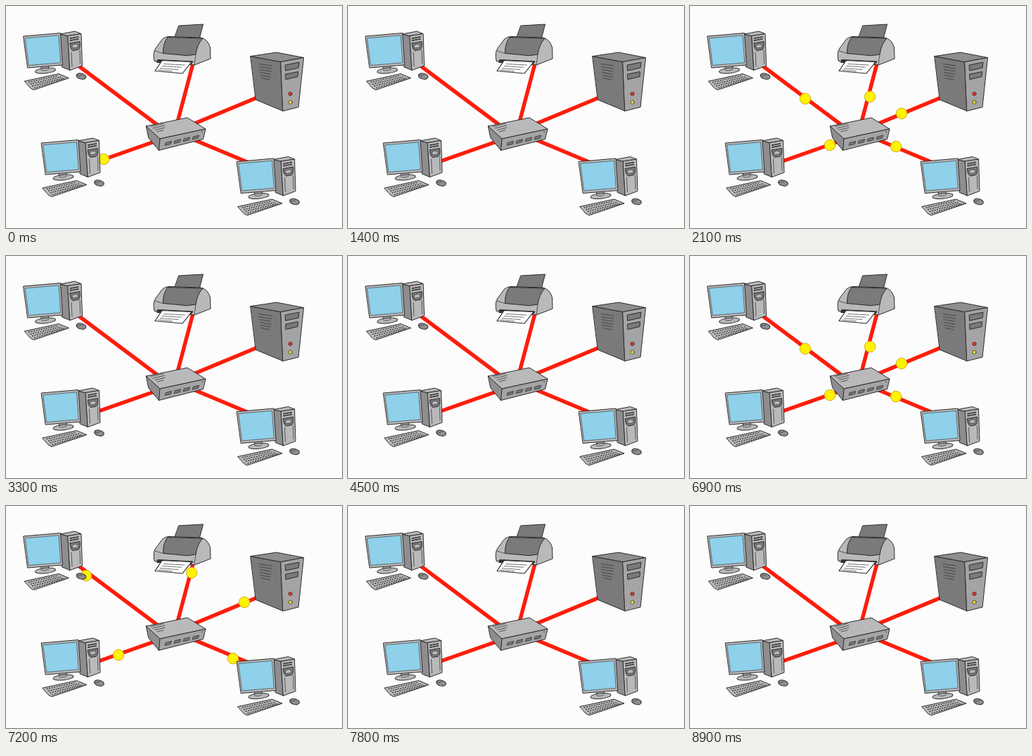
These frames come from a looping animation (478 by 316 pixels, 9 s). An HTML page:

```html
<!DOCTYPE html>
<html lang="en">
<head>
<meta charset="utf-8">
<title>Network hub</title>
<style>
  html, body { margin: 0; width: 100%; height: 100%; overflow: hidden; background: #fdfcfd; }
  svg { display: block; width: 100vw; height: 100vh; }
  .ink { stroke: #2b2b2b; stroke-width: 1; stroke-linejoin: round; stroke-linecap: round; }
  .thin { stroke: #3a3a3a; stroke-width: .8; fill: none; stroke-linecap: round; }
  .light { fill: #b9b9bb; }
  .mid { fill: #a4a4a7; }
  .dim { fill: #8e8d90; }
  .dark { fill: #7b797c; }
  .screen { fill: #8fd0ea; }
  #cables { stroke: #fd1d0b; stroke-width: 5.4; fill: none; }
  #balls circle { fill: #fff204; stroke: #c79d12; stroke-width: .8; }
</style>
</head>
<body>
<svg viewBox="0 0 478 316">
  <defs>
    <g id="computer" class="ink">
      <path class="dim" d="M77 40 88 42.5 91 91.5 80 87Z"/>
      <path class="light" d="M77 40 98 36 107 39.5 88 42.5Z"/>
      <path class="light" d="M88 42.5 107 39.5 108.5 85 91 91.5Z"/>
      <path class="thin" d="M91.5 46 104 43.8M91.5 49 104 46.8" stroke-dasharray="2.6 1.8" style="stroke-width:1.8"/>
      <path class="dark" d="M91 53 105 50.5Q106 60 103 62L95 63.5Q91 61 91 53Z"/>
      <path class="light" d="M94 56Q98 53 102.5 55L102 59 95 60Z" stroke-width=".6"/>
      <path class="thin" d="M93 66 94 86M105 63 105.5 82"/>
      <path class="light" d="M50 85 61 84 60 91 51 92Z"/>
      <ellipse class="light" cx="56" cy="92" rx="14.5" ry="3.8" transform="rotate(-6 56 92)"/>
      <path class="thin" d="M50 91Q55 93.5 61 90"/>
      <path class="light" d="M25 43 77.5 38.5 80.5 84 31 88Z"/>
      <path class="screen" d="M27.5 45.8 75 41.8 77.8 80.8 32.5 84.5Z" stroke-width=".6"/>
      <path class="light" d="M26.5 107 75 96.5 89.5 102.5 39.5 119.5 35 117Z"/>
      <path d="M32 108.5 74.5 99M34.5 111.3 79 100.8M37 114 83 102.4M40 116.8 86 103"
            fill="none" stroke="#444" stroke-width="1.5" stroke-linecap="butt" stroke-dasharray="2.2 1.4"/>
      <ellipse class="dim" cx="107" cy="100" rx="7" ry="4" transform="rotate(14 107 100)"/>
      <path class="thin" d="M101 98.5Q105 101 109 96.8"/>
    </g>
  </defs>

  <g id="cables">
    <path d="M103 85 217 170.5M266 82 244 165M358 130 264 169M344 222.5 264 189M130 221.5 217 191"/>
  </g>
  <g id="balls"></g>

  <g class="ink">
    <path class="light" d="M199.5 171 258 159 284 175 219 189Z"/>
    <path class="mid" d="M219 189 284 175 280.5 189.5 217.5 205.5Z"/>
    <path class="dim" d="M199.5 171 219 189 217.5 205.5 203 188Z"/>
    <path class="thin" d="M206 171.5 224 167.5M209 174 226 170M212 176.5 226 173.2M215 179 224 176.8"/>
    <g id="ports"></g>
    <circle cx="279" cy="179" r="1" fill="#855" stroke="none"/>
  </g>

  <g class="ink">
    <path class="dark" d="M246 28 280.5 26 275 47 240 45Z"/>
    <path class="light" d="M211 78Q208.5 66 213 60L219 52Q223 44 232 43.5L277 45Q287 47 290.5 59L291 75 268 84 262 83Z"/>
    <path class="dark" d="M230 44.5 280 46Q272 54 270 69Q257 72 246 69.5L223.5 67.5Q223 53 230 44.5Z"/>
    <path class="thin" d="M212 64 223.5 67.5M270 69 268 83"/>
    <path d="M216 76.5 266 79 263 83 215 80.5Z" fill="#333"/>
    <path d="M222 77.5 264 79.5 251 96 212 92.5Z" fill="#fff" stroke-width="1.2"/>
    <path d="M225 82.5 254 84M222.5 85.5 250 87.2M219.5 88.6 245 90.5M217 91 237 92.8"
          fill="none" stroke="#555" stroke-width=".9" stroke-dasharray="5 1.2 3 1"/>
  </g>

  <g class="ink">
    <path class="dark" d="M348 71.5 391 79.5 394 149.5 355.5 133.5Z"/>
    <path class="dim" d="M348 71.5 385 66 423.5 73.5 391 79.5Z"/>
    <path class="mid" d="M391 79.5 423.5 73.5 416 144 394 149.5Z"/>
    <path class="dark" d="M397.5 84 417 80 416 88 398 92Z"/>
    <path class="dark" d="M398 97 415.5 93.5 415 100.5 398.3 104.5Z"/>
    <path class="thin" d="M360 82.5 378 85M360.5 86.5 378 89.2M361 90.5 377 93M361.5 94.5 377 97.2M362 98.5 376 101M363 102.5 375 105"/>
    <circle cx="404.5" cy="125" r="2.6" fill="#ed3024" stroke-width=".7"/>
    <circle cx="404.5" cy="137" r="2.6" fill="#e9dc2a" stroke-width=".7"/>
  </g>

  <use href="#computer"/>
  <use href="#computer" x="25.5" y="152"/>
  <use href="#computer" x="303.5" y="178.5"/>
</svg>

<script>
  const NS = 'http://www.w3.org/2000/svg';
  const LOOP = 9000, STEP = 100, RADIUS = 7.8;

  function add(parent, tag, attrs) {
    const node = document.createElementNS(NS, tag);
    for (const name in attrs) node.setAttribute(name, attrs[name]);
    return document.getElementById(parent).appendChild(node);
  }

  for (let i = 0; i < 4; i++) {
    add('ports', 'path', {
      class: 'dark', 'stroke-width': .8,
      d: `M${227.5 + i * 13} ${194.5 - i * 2.8}l8-2-1 3.8-8 2Z`
    });
  }

  // Each ball has a start point and a shift per step; its path ends behind a device.
  const ball = (x, y, dx, dy, start, steps) =>
    ({ x, y, dx, dy, start, steps, node: add('balls', 'circle', { r: RADIUS }) });

  const broadcast = start => [
    [247.3, 187, -16.67, -11],
    [242.7, 185.7, 2.67, -11.33],
    [237.7, 179.7, 12.67, -5.33],
    [243, 171.7, 10, 5.67],
    [264, 174.7, -13, 4.67]
  ].map(path => ball(...path, start, 11));

  const balls = [
    ball(139, 218, 12.2, -4.2, 0, 8),
    ...broadcast(1600),
    ball(110, 92, 14.6, 10.2, 4900, 8),
    ...broadcast(6400)
  ];

  function render(time) {
    const now = Math.floor((time % LOOP) / STEP) * STEP;
    for (const b of balls) {
      const k = (now - b.start) / STEP;
      const visible = k >= 0 && k <= b.steps;
      b.node.setAttribute('visibility', visible ? 'visible' : 'hidden');
      if (!visible) continue;
      b.node.setAttribute('cx', b.x + b.dx * k);
      b.node.setAttribute('cy', b.y + b.dy * k);
    }
  }

  const begin = performance.now();
  function tick() {
    render(performance.now() - begin);
    requestAnimationFrame(tick);
  }
  tick();
</script>
</body>
</html>
```
